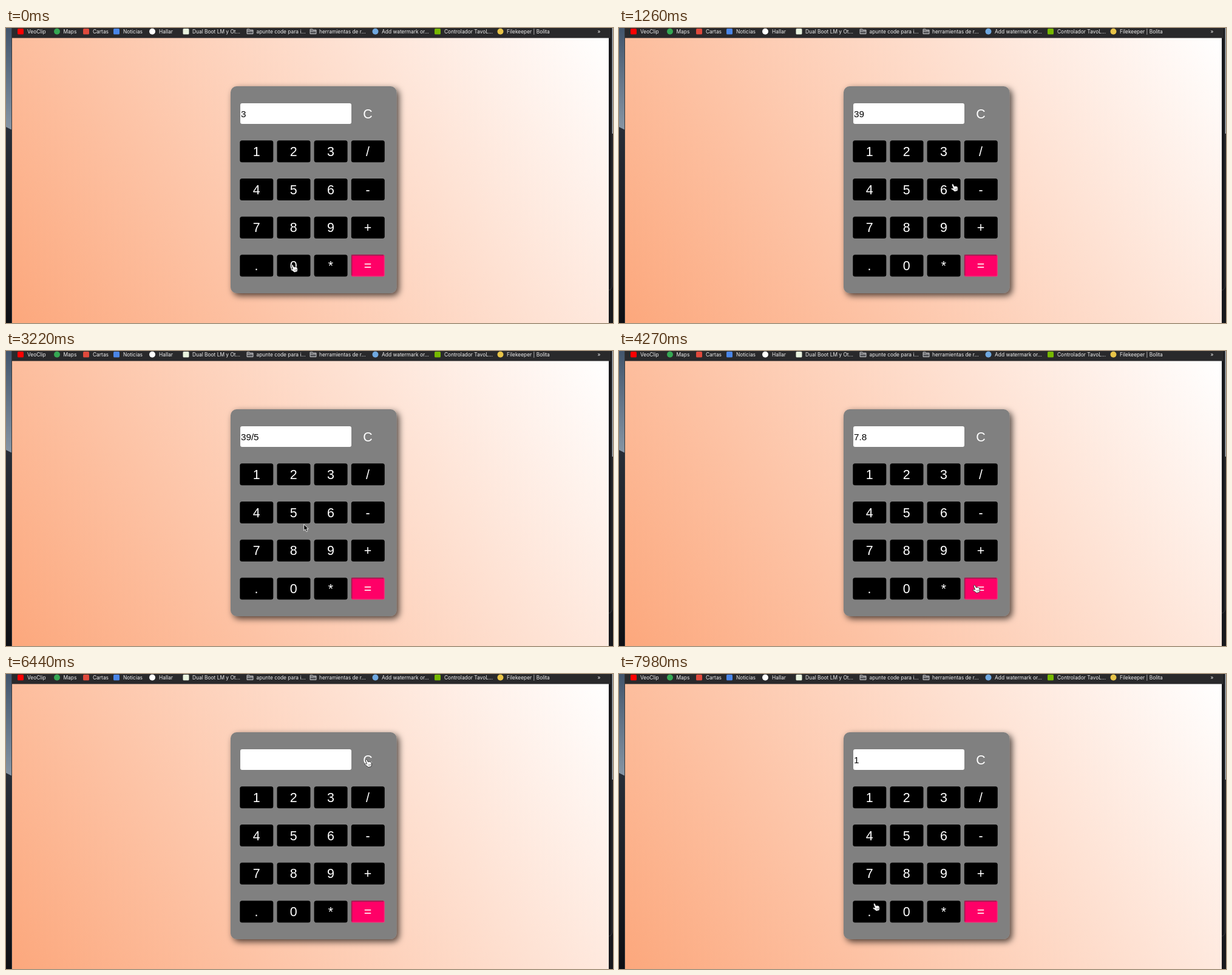
Animation, 1000 px wide and 486 px high, one loop 8 s. Source, as an HTML page:

```html
<!DOCTYPE html>
<html lang="es">
<head>
<meta charset="utf-8">
<title>Calculadora</title>
<style>
  html, body { margin: 0; width: 100%; height: 100%; overflow: hidden; background: #17181c; }
  svg { display: block; width: 100%; height: 100%; }
  text { white-space: pre; }
  .tabs { font: 400 8.4px Inter, sans-serif; fill: #f0f0f0; }
  .keys { font: 21.4px "Liberation Sans", Arial, sans-serif; fill: #fff; text-anchor: middle; }
  #display { font: 15.2px "Liberation Sans", Arial, sans-serif; fill: #000; }
</style>
</head>
<body>
<svg viewBox="0 0 1000 486">
  <defs>
    <linearGradient id="page" gradientUnits="userSpaceOnUse" x1="55" y1="579" x2="948" y2="-47">
      <stop offset="0" stop-color="#fca67a"/>
      <stop offset="1" stop-color="#fff"/>
    </linearGradient>
    <linearGradient id="sky" x1="0" y1="0" x2="0" y2="1">
      <stop offset="0" stop-color="#42556c"/>
      <stop offset="1" stop-color="#8796a5"/>
    </linearGradient>
    <linearGradient id="hills" x1="0" y1="0" x2="0" y2="1">
      <stop offset="0" stop-color="#282e38"/>
      <stop offset="1" stop-color="#0d0f14"/>
    </linearGradient>
    <filter id="shadow" x="-20%" y="-20%" width="140%" height="140%">
      <feDropShadow dx="4" dy="4" stdDeviation="5.5" flood-color="#000" flood-opacity=".7"/>
    </filter>
  </defs>

  <rect width="1000" height="486" fill="#17181c"/>
  <rect width="10" height="170" fill="url(#sky)"/>
  <path d="M0 163 L10 168 V486 H0 Z" fill="url(#hills)"/>
  <rect x="998.5" width="1.5" height="174" fill="#a9b0b7"/>
  <path d="M998.5 174 V424 Q998.5 431 993 432" fill="none" stroke="#393a3e"/>
  <rect x="9" width="1" height="486" fill="#35383c"/>
  <rect x="10" width="986" height="17" fill="#29292b"/>
  <rect x="10" y="16.5" width="983" height="469.5" fill="url(#page)"/>

  <g id="tabs" class="tabs"></g>

  <rect x="370" y="96" width="273.5" height="341" rx="10" fill="#808080" filter="url(#shadow)"/>
  <rect x="386" y="124" width="183" height="34" rx="3" fill="#fff"/>
  <text id="display" x="387" y="147"></text>
  <g id="keys" class="keys"></g>

  <path id="arrow" d="M0 0 V10.2 L2.4 8 L4.2 12 L6.2 11.1 L4.5 7.3 H7.6 Z"
    fill="#080808" stroke="#fff" stroke-width=".9" stroke-linejoin="round"/>
  <g id="hand">
    <path d="M-1.4 .4 Q-.2 -.9 .8 .5 L2.5 4 Q3.4 2.9 4.3 3.8 Q5.4 3 6.1 4 Q7.3 3.6 7.8 4.9 L8.5 8.2 L7.7 11.4 L3 12.6 L-.6 9.7 Q-3.6 8.6 -2.7 7.2 Q-1.9 6.3 .6 7.3 L-1.5 2.1 Z"
      fill="#fff" stroke="#1b1b1b" stroke-width=".8" stroke-linejoin="round"/>
    <path d="M3.4 8 L4 10.3 M5.1 7.5 L5.7 9.8 M6.7 7 L7.2 9.3" fill="none" stroke="#333" stroke-width=".6"/>
  </g>
</svg>
<script>
const NS = 'http://www.w3.org/2000/svg';
const byId = id => document.getElementById(id);

function add(parent, tag, attrs, text) {
  const el = document.createElementNS(NS, tag);
  for (const k in attrs) el.setAttribute(k, attrs[k]);
  if (text) el.textContent = text;
  parent.appendChild(el);
}

// Bookmarks: label, text x, icon x, icon shape, icon colour
const bookmarks = [
  ['VeoClip', 35, 24, 'square', '#f00'],
  ['Maps', 94.5, 84, 'circle', '#35a853'],
  ['Cartas', 143, 132, 'square', '#e04a3c'],
  ['Noticias', 193, 182, 'square', '#4a86e8'],
  ['Hallar', 252, 241, 'circle', '#fff'],
  ['Dual Boot LM y Ot...', 307, 296.5, 'square', '#e9f3df'],
  ['apunte code para i...', 412.5, 402, 'folder'],
  ['herramientas de r...', 516, 506, 'folder'],
  ['Add watermark or...', 619, 608.5, 'circle', '#6fa8e0'],
  ['Controlador TavoL...', 722, 711, 'square', '#76b900'],
  ['Filekeeper | Bolita', 825, 814.5, 'circle', '#e8c448']
];
const tabs = byId('tabs');
for (const [label, x, cx, shape, fill] of bookmarks) {
  if (shape === 'circle') add(tabs, 'circle', { cx, cy: 5.7, r: 5, fill });
  else if (shape === 'square') add(tabs, 'rect', { x: cx - 5, y: .9, width: 10, height: 9.6, rx: 1.5, fill });
  else add(tabs, 'path', {
    d: `M${cx - 5} 9.6 V2 H${cx - 1} L${cx} 3.2 H${cx + 5} V9.6 Z M${cx - 5} 5 H${cx + 5}`,
    fill: '#55565a', stroke: '#c9c9cb', 'stroke-width': 1
  });
  add(tabs, 'text', { x, y: 8.8 }, label);
}
add(tabs, 'text', { x: 974.5, y: 8.6 }, '»');

// Calculator buttons
const colX = [385.3, 446.5, 507.6, 568.8], rowY = [185.3, 248.1, 310.8, 373.6];
const W = 55, H = 36, buttons = [[568.8, 123]];
const keys = byId('keys');
add(keys, 'text', { x: 596, y: 148.6 }, 'C');
[...'123/456-789+.0*='].forEach((label, i) => {
  const x = colX[i % 4], y = rowY[i >> 2], equals = label === '=';
  buttons.push([x, y]);
  add(keys, 'rect', { x, y, width: W, height: H, rx: 3.5, fill: equals ? '#ff0067' : '#000' });
  if (equals) {
    add(keys, 'path', { d: `M${x + .8} ${y + H - 2} V${y + .8} H${x + W - 2}`, fill: 'none', stroke: '#98204f', 'stroke-width': 1.6 });
    add(keys, 'path', { d: `M${x + 2} ${y + H - .6} H${x + W - .6} V${y + 2}`, fill: 'none', stroke: '#e44b83', 'stroke-width': 1 });
  }
  add(keys, 'text', { x: x + W / 2 - .2, y: y + 25.6 }, label);
});

const LOOP = 8000, STEP = 70;
// Pointer path: time, x, y
const path = [
  [0, 472, 390], [630, 532, 330], [910, 532, 330], [1260, 550, 257],
  [1610, 594, 205], [1890, 594, 205], [2310, 542, 236.5], [2730, 473, 267],
  [3010, 473, 267], [3850, 586, 386], [5110, 586, 386], [5740, 545, 289],
  [6230, 594, 141], [6510, 594, 141], [7070, 445, 192.5], [7280, 414, 204],
  [7490, 414, 204], [7980, 421, 378]
];
const readings = [[0, '3'], [770, '39'], [1820, '39/'], [2870, '39/5'], [4060, '7.8'], [6440, ''], [7420, '1']];

const slope = (i, k) => path[i + 1] ? (path[i + 1][k] - path[i][k]) / (path[i + 1][0] - path[i][0]) : 0;

function tangent(i, k) {
  if (!i) return 0;
  const a = slope(i - 1, k), b = slope(i, k);
  return a * b > 0 ? 2 * a * b / (a + b) : 0;
}

// Monotone cubic through the path points
function pointAt(t, k) {
  let i = 0;
  while (i < path.length - 2 && t >= path[i + 1][0]) i++;
  const p = path[i], q = path[i + 1], d = q[0] - p[0];
  const u = Math.min(1, (t - p[0]) / d), v = 1 - u;
  return v * v * (1 + 2 * u) * p[k] + u * u * (3 - 2 * u) * q[k]
    + d * u * v * (v * tangent(i, k) - u * tangent(i + 1, k));
}

const display = byId('display'), arrow = byId('arrow'), hand = byId('hand');

function draw(now) {
  const t = Math.floor((now % LOOP) / STEP) * STEP;
  const x = pointAt(t, 1), y = pointAt(t, 2);
  const over = buttons.some(([bx, by]) => x >= bx && x <= bx + W && y >= by && y <= by + H);
  const active = over ? hand : arrow;
  active.setAttribute('transform', `translate(${x.toFixed(1)} ${y.toFixed(1)})`);
  hand.style.display = over ? '' : 'none';
  arrow.style.display = over ? 'none' : '';
  display.textContent = readings.filter(r => r[0] <= t).pop()[1];
}

const start = performance.now();
function tick() {
  draw(performance.now() - start);
  requestAnimationFrame(tick);
}
tick();
</script>
</body>
</html>
```
